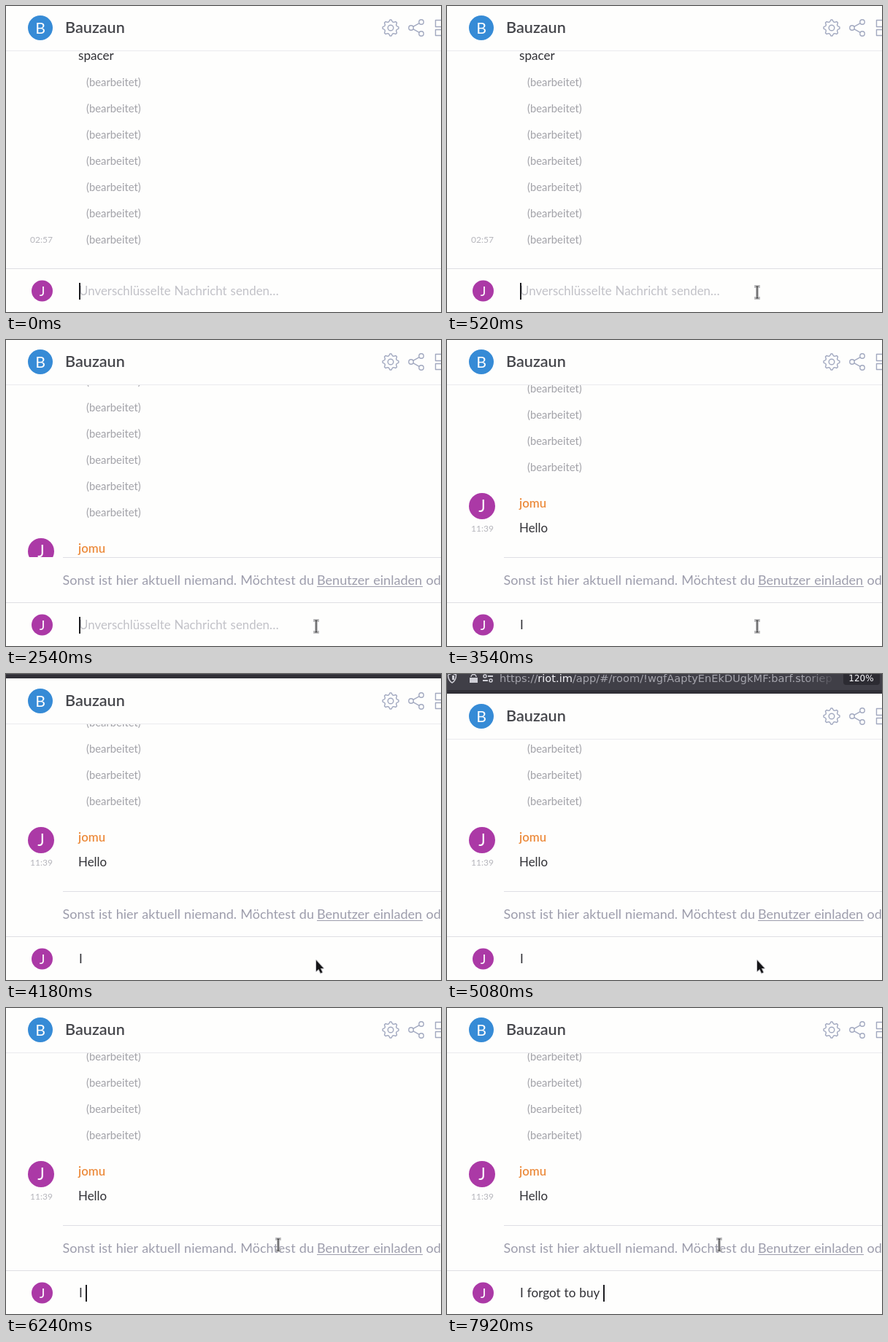
Animation, 596 px wide and 420 px high, one loop 8000 ms. Source, as an HTML page with a canvas:

```html
<!DOCTYPE html>
<html lang="de">
<head>
<meta charset="utf-8">
<title>Chat</title>
<style>
html, body { margin: 0; width: 100%; height: 100%; overflow: hidden; background: #fefefd; }
canvas { display: block; }
</style>
</head>
<body>
<canvas id="stage" width="596" height="420"></canvas>
<script>
const ctx = document.getElementById('stage').getContext('2d');
const W = 596, H = 420, LOOP = 8000;
const SANS = 'Lato, "Open Sans", sans-serif';
const UI = '"DejaVu Sans", sans-serif';
const BG = '#fefefd', INK = '#313136', MUTED = '#a2a2a8', TIME = '#b6b6bc', RULE = '#dfdfe4';
const ICON = '#a2a9c0', BLUE = '#368bd6', PURPLE = '#ab39a6';

// [time, text in the composer]
const typing = [
  [0, ''], [860, 'H'], [960, 'He'], [1080, 'Hel'], [1200, 'Hell'], [1340, 'Hello'],
  [1660, ''], [3200, 'I'], [3360, 'I '],
  [6540, 'I f'], [6600, 'I fo'], [6680, 'I for'], [6740, 'I forg'], [6820, 'I forgo'], [6940, 'I forgot'],
  [7220, 'I forgot '], [7300, 'I forgot t'], [7360, 'I forgot to'], [7440, 'I forgot to '],
  [7640, 'I forgot to b'], [7720, 'I forgot to bu'], [7800, 'I forgot to buy'], [7920, 'I forgot to buy ']
];
const caret = [[0, true], [1720, false], [2540, true], [3540, false], [4240, true], [5080, false], [5860, true]];
const scroll = [[0, 0], [1660, 84], [3540, 146]];

const at = (keys, t) => keys.filter(k => k[0] <= t).pop()[1];
const ramp = (t, a, b) => Math.min(1, Math.max(0, (t - a) / (b - a)));
const easeOut = p => 1 - (1 - p) ** 3;
const easeInOut = p => p * p * (3 - 2 * p);
const mix = (a, b, p) => a + (b - a) * p;

function text(str, x, y, size, color, { weight = 400, family = SANS, align = 'left', space = 0.6 } = {}) {
  ctx.font = `${weight} ${size}px ${family}`;
  ctx.wordSpacing = space + 'px';
  ctx.textAlign = align;
  ctx.fillStyle = color;
  ctx.fillText(str, x, y);
  return ctx.measureText(str).width;
}

function box(x, y, w, h, color) {
  ctx.fillStyle = color;
  ctx.fillRect(x, y, w, h);
}

function clipTo(y0, y1, draw) {
  ctx.save();
  ctx.beginPath();
  ctx.rect(0, y0, W, y1 - y0);
  ctx.clip();
  draw();
  ctx.restore();
}

function avatar(letter, x, y, r, color) {
  ctx.fillStyle = color;
  ctx.beginPath();
  ctx.arc(x, y, r, 0, 7);
  ctx.fill();
  const size = r * 1.25;
  text(letter, x, y + size * 0.36, size, '#fff', { align: 'center' });
}

function ring(x, y, r) {
  ctx.beginPath();
  ctx.arc(x, y, r, 0, 7);
  ctx.stroke();
}

function gear(x, y) {
  ctx.beginPath();
  for (let i = 0; i < 32; i++) {
    const a = (i - 0.5) * Math.PI / 16 - Math.PI / 2;
    const r = i % 4 < 2 ? 11 : 8.6;
    ctx.lineTo(x + r * Math.cos(a), y + r * Math.sin(a));
  }
  ctx.closePath();
  ctx.stroke();
  ring(x, y, 3.8);
}

function header(y) {
  box(0, y, W, 61, BG);
  box(0, y + 61, W, 1, '#ebebee');
  avatar('B', 47, y + 30, 17, BLUE);
  text('Bauzaun', 81, y + 37, 21.6, '#45464b', { weight: 600 });
  ctx.strokeStyle = ICON;
  ctx.lineWidth = 1.4;
  ctx.lineJoin = 'round';
  gear(527, y + 30);
  ring(569, y + 22, 3.2);
  ring(555, y + 30, 3.2);
  ring(569, y + 38, 3.2);
  ctx.beginPath();
  ctx.moveTo(566.2, y + 23.6);
  ctx.lineTo(557.8, y + 28.4);
  ctx.moveTo(557.8, y + 31.6);
  ctx.lineTo(566.2, y + 36.4);
  ctx.stroke();
  ctx.strokeRect(588.5, y + 19.5, 14, 9);
  ctx.strokeRect(588.5, y + 32.5, 14, 8);
}

function messages(t) {
  const s = at(scroll, t), sent = t >= 1660;
  text('spacer', 99, 74 - s, 17.1, INK);
  for (let i = 0; i < 7; i++) text('(bearbeitet)', 110, 110 + 36 * i - s, 14.8, MUTED);
  if (!sent) {
    text('02:57', 33, 325, 12, TIME);
    return;
  }
  avatar('J', 48, 374 - s, 18, PURPLE);
  text('jomu', 99, 375.5 - s, 16.8, '#ec8b3c', { weight: 600 });
  text('Hello', 99, 410 - s, 16.9, t < 1720 ? MUTED : INK);
  text('11:39', 33, 409 - s, 12, TIME);
}

function statusBar(y) {
  box(78, y, W, 1, RULE);
  const color = '#9d9dac';
  text('Sonst ist hier aktuell niemand. Möchtest du', 77.5, y + 38, 18, color);
  text('Benutzer einladen', 426, y + 38, 18.1, color);
  box(426, y + 40, 145, 1, color);
  text('oder', 575.5, y + 38, 18, color);
}

function composer(t) {
  box(0, 360, W, 60, BG);
  box(0, 360, W, 1, RULE);
  avatar('J', 49.5, 391, 14.5, PURPLE);
  const str = at(typing, t);
  if (!str) text('Unverschlüsselte Nachricht senden…', 100, 397, 16.9, '#c2c2c8');
  const w = text(str, 100, 397, 17.1, INK);
  if (at(caret, t)) box(Math.round(100 + w - 0.3), 380, 2, 23, '#1c1c20');
}

function browserBar(y) {
  box(0, y, W, 27, '#313037');
  box(0, y, W, 22, '#403f47');
  const pale = '#cfcfd6';
  ctx.strokeStyle = pale;
  ctx.lineWidth = 1.5;
  // shield
  ctx.beginPath();
  ctx.moveTo(1.5, y + 1);
  ctx.lineTo(7, y - 1);
  ctx.lineTo(12.5, y + 1);
  ctx.quadraticCurveTo(12.5, y + 9, 7, y + 12);
  ctx.quadraticCurveTo(1.5, y + 9, 1.5, y + 1);
  ctx.stroke();
  box(7, y + 2, 3, 6, pale);
  // lock
  box(31, y + 5, 11, 7, pale);
  ctx.beginPath();
  ctx.arc(36.5, y + 4, 3.5, Math.PI, 0);
  ctx.stroke();
  // permission switches
  ring(52, y + 3, 2);
  box(56, y + 2, 7, 2, pale);
  ring(60, y + 9, 2);
  box(49, y + 8, 7, 2, pale);

  const fade = ctx.createLinearGradient(490, 0, 534, 0);
  fade.addColorStop(0, '#a5a5ad');
  fade.addColorStop(1, 'rgba(165,165,173,0)');
  let x = 72;
  for (const [part, color] of [['https://', fade], ['riot.im', '#f2f2f6'],
    ['/app/#/room/!wgfAaptyEnEkDUgkMF:barf.storiep', fade]])
    x += text(part, x, y + 11, 14.6, color, { family: UI, space: 0 });
  ctx.fillStyle = '#2c2b32';
  ctx.beginPath();
  ctx.roundRect(543, y - 6, 50, 21, 4);
  ctx.fill();
  text('120%', 567.5, y + 10, 12, '#f7f7fa', { family: UI, align: 'center' });
}

function beam(x, y) {
  const trace = (color, width) => {
    ctx.strokeStyle = color;
    ctx.lineWidth = width;
    ctx.beginPath();
    ctx.moveTo(x - 2, y - 8);
    ctx.lineTo(x + 2, y - 8);
    ctx.moveTo(x, y - 8);
    ctx.lineTo(x, y + 8);
    ctx.moveTo(x - 2, y + 8);
    ctx.lineTo(x + 2, y + 8);
    ctx.stroke();
  };
  ctx.lineCap = 'square';
  trace('#8c8c90', 3.4);
  trace('#fff', 2.4);
  trace('#1a1a1c', 1.2);
  ctx.lineCap = 'butt';
}

function arrow(x, y) {
  const pts = [[0, 0], [0, 15], [3.4, 12], [6, 17.6], [8.4, 16.5], [5.9, 11], [10, 11]];
  ctx.beginPath();
  for (const [dx, dy] of pts) ctx.lineTo(x + dx, y + dy);
  ctx.closePath();
  ctx.strokeStyle = '#c8c8cc';
  ctx.lineWidth = 2;
  ctx.stroke();
  ctx.fillStyle = '#151517';
  ctx.fill();
}

function pointer(t, bar) {
  if (t < 260) return;
  const enter = easeOut(ramp(t, 240, 520)), leave = easeInOut(ramp(t, 5840, 6240));
  const x = mix(mix(596, 425, enter), 373, leave);
  const y = mix(mix(422, 393, enter), 325, leave);
  (bar > 0 ? arrow : beam)(x, y);
}

function draw(t) {
  const bar = ramp(t, 4160, 4240) * (1 - ramp(t, 5820, 5900));
  const top = Math.round(28 * bar);
  const rise = ramp(t, 1892, 2060);
  const status = Math.round(360 - 62 * easeInOut(rise));
  box(0, 0, W, H, BG);
  clipTo(top + 62, status, () => messages(t));
  if (rise > 0) clipTo(status, 360, () => statusBar(status));
  composer(t);
  header(top);
  if (top > 0) browserBar(top - 28);
  pointer(t, bar);
}

const start = performance.now();
function tick() {
  draw((performance.now() - start) % LOOP);
  requestAnimationFrame(tick);
}
tick();
</script>
</body>
</html>
```
